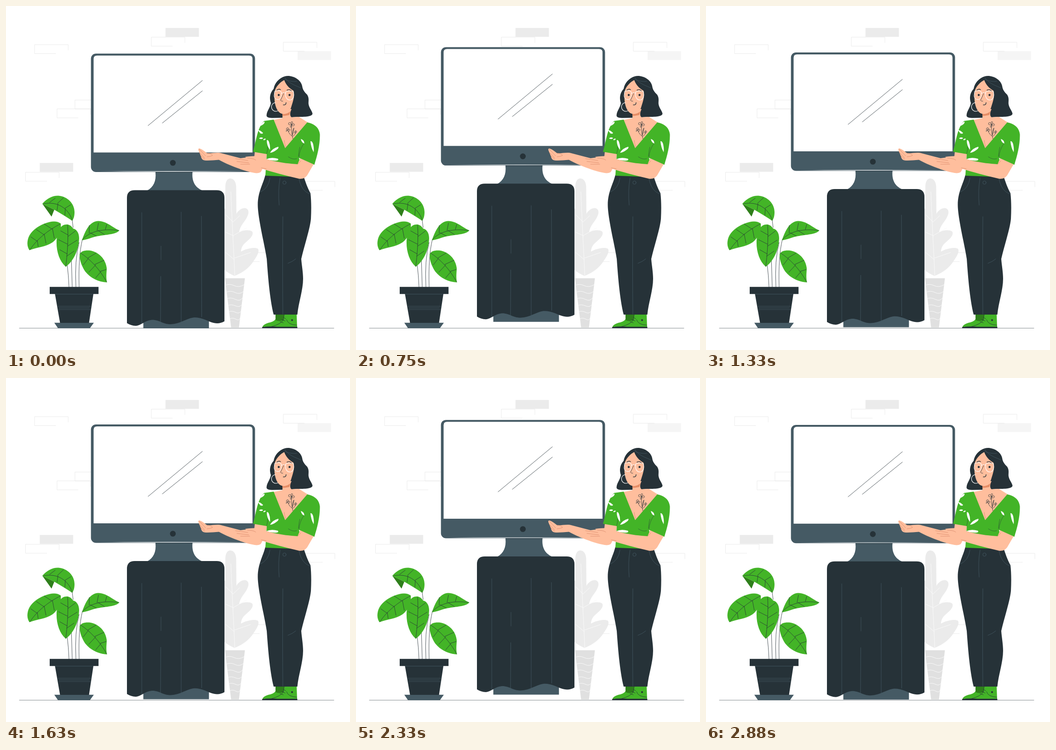
Write an HTML page that moves like this. It is 748x748 px and loops after 2930 ms.

```html
<!DOCTYPE html>
<html lang="en">
<head>
<meta charset="utf-8">
<title>Floating monitor</title>
<style>
html, body { margin: 0; width: 100%; height: 100%; overflow: hidden; background: #fff; }
svg { display: block; width: 100vw; height: 100vh; }
.dark { fill: #263238; }
.slate { fill: #455a64; }
.green { fill: #43b427; }
.deep { fill: #2f7f1b; }
.skin { fill: #ffbe9d; }
.pale { fill: #ebebeb; }
.line { fill: none; stroke: #263238; stroke-width: .8; stroke-linecap: round; stroke-linejoin: round; }
.bold { stroke-width: 1.4; }
.seam { stroke: #455a64; }
.faint { stroke: #e6e6e6; }
.vein { stroke: #fafafa; stroke-width: 1; }
.crease { stroke: #d98a6a; }
.white { stroke: #fff; stroke-width: 1.1; }
</style>
</head>
<body>
<svg viewBox="0 0 748 748">
  <defs>
    <path id="brick" class="line faint" d="M73 12V0H0V19.500H46"/>
    <rect id="block" width="72.700" height="19.200"/>
  </defs>

  <!-- wall -->
  <use href="#block" class="pale" x="346.800" y="47.800"/>
  <use href="#block" class="pale" x="73.400" y="341.300"/>
  <use href="#block" fill="#f5f5f5" x="634" y="98.200"/>
  <use href="#brick" x="316" y="67.800"/>
  <use href="#brick" x="62.200" y="84"/>
  <use href="#brick" x="603" y="78.800"/>
  <use href="#brick" x="150" y="204.400"/>
  <use href="#brick" x="111" y="223.700"/>
  <use href="#brick" x="42.500" y="361.500"/>
  <use href="#brick" x="642" y="381.200"/>
  <use href="#brick" x="505" y="536.300"/>
  <path class="line" stroke-opacity=".7" d="M29 700.500H713"/>

  <!-- grey plant -->
  <path class="pale" d="M488 375C496 375 500.500 384 500.500 394L501 452C505 444 514 438 522 440C529 443 528 451 525 457C521 468 509 476 507 492C515 487 529 486 535 490C539 495 534 502 529 507C521 515 512 519 511 534C521 528 540 523 548 528C552 534 545 545 538 555C528 571 512 581 497 587C488 583 480 579 466 566V446L477 440V394C477 383 480 375 488 375Z"/>
  <path class="line vein" d="M489 404C491 460 495 530 497.500 586M478 454L494 470M494.500 469L508 456M478 492L495.500 500M496 498L523 483M478 536L497 552M497 548L532 536"/>
  <path fill="#e0e0e0" d="M476 592H519.500L506.500 699H489.500Z"/>
  <path class="line vein" d="M478 607Q486 603 496 608T518 606M480 622Q488 618 498 623T516 621M481 636Q489 633 499 638T514 635M483 651Q490 648 499 652T512 650M484 665Q491 662 499 666T511 664M487 680Q493 677 500 681T509 679"/>

  <!-- monitor and stand -->
  <g id="float">
    <path class="slate" d="M298.600 660H441.300V701H298.600Z"/>
    <path class="slate" d="M325 355H405.500V362C404 380 410 394 427.500 401.500H306.500C321 394 327 380 325 362Z"/>
    <path class="dark" d="M280 400.500H458Q475 400.500 475 417V685.500C466 691 456 691 446 687.500C432 682 421 676 407 677.500C391 680 379 691 358 692C340 692 334 682 317 682.500C301 684 295 694.500 282 695.500C275 695.500 269 693 263 689.500V417Q263 400.500 280 400.500Z"/>
    <path class="line seam" d="M295.200 449V690M337 522V552M336.500 588L336 686M380.900 448V688M425 457L425.500 676"/>
    <rect class="slate" x="184.700" y="103.600" width="356.800" height="257.400" rx="11"/>
    <path fill="#fff" d="M190.500 318.500V115Q190.500 107.700 198 107.700H528.500Q536 107.700 536 115V318.500Z"/>
    <circle class="dark" cx="362.800" cy="341" r="6.300"/>
    <path class="line" d="M309 260L427 162M340 254.500L427 184.500"/>
    <path fill="#fff" d="M203 359.600Q360 358.600 516 359.600Q360 360.800 203 359.600Z"/>
    <path class="line" d="M326 361.700H405" stroke-opacity=".7"/>
  </g>

  <!-- potted plant -->
  <path class="line" d="M133 562Q136 585 137 611M142 545L144 611M159 514Q149 552 152 611M166 508Q157 545 159 611M144 466L146 482"/>
  <g class="green">
    <path d="M79 430C89 418 102 412 114 412.500C134 414 149 430 149 448C149 457 147 463 144 467C132 459 119 451 105 443Z"/>
    <path d="M119 473C110 466 97 468 84 473C68 479 54 490 49 503C45 514 46 524 51 531C65 525 87 524 101 514C113 505 121 489 119 473Z"/>
    <path d="M134 475C119 474 112 487 110 510C109 533 116 555 130 567C144 557 158 535 159 505C159 493 153 485 146 484C143 479 139 476 134 475Z"/>
    <path d="M165 509.500C171 494 179 469 200 467.500C218 467 232 482 246.500 488C239 497 218 497 199 500.500C186 503 177 508 165 509.500Z"/>
    <path d="M160 541C162 533 171 531 181 531.500C201 534 217 550 219 570C219 579 217 588 219.500 601C201 600 184 592 172 577C164 565 160 552 160 541Z"/>
  </g>
  <path class="deep" d="M79 430L105 443L99 458Z"/>
  <path class="line" d="M82 430C112 424 136 440 144 466M95 427L107 418M112 429L125 417M113 430L111 444M128 440L141 432M129 441L128 455M118 474C92 487 67 507 52 530M100 485L83 474M101 484L105 505M82 497L66 486M83 496L87 516M67 511L54 502M68 510L70 523M134 477C136 506 133 543 130 566M135 498L119 489M135 501L151 489M134 518L114 508M134 522L155 509M133 539L117 530M132 544L148 533M166 508C184 488 213 484 245 488M181 494L181 477M183 493L196 500M198 488L201 472M200 488L214 497M216 486L219 475M162 537C184 551 204 573 219 600M178 548L196 537M179 549L168 563M193 562L213 553M195 563L180 579M205 577L218 573M206 578L195 591"/>
  <path class="slate" d="M105 688.800H191L182.500 700.500H113Z"/>
  <path class="dark" d="M95 610.800H201.200V626.300H190L180.500 689H117.500L106.500 626.300H95Z"/>
  <path class="line seam" d="M107 626.500H189M113 653H185M115 656.500H181M115 660H184"/>

  <!-- shoes and trousers -->
  <path class="green" d="M586 670H632L633 698H558Q558 693 570 689Q582 687 586 681Z"/>
  <path class="deep" d="M586 670H605L603 683Q594 687 586 683Z"/>
  <path class="line" d="M605 671L603 683Q597 692 578 697M596 686L603 689M600 682L607 685M603 677L608 680M610 682Q613 693 632 694"/>
  <circle class="dark" cx="622" cy="683" r="2"/>
  <path class="dark" d="M557 698Q578 696 590 697.500H633.500V700.500H557Z"/>
  <path class="dark" d="M564 367C559 388 547 405 547.500 434C548 462 563 523 567 550C569 578 573 636 582 671H633.500C636 645 646 618 646 593C646 578 643 564 642 550C648 523 661 485 663 463C664 443 664 424 662 407C655 394 651 382 647 370Z"/>
  <path class="line seam" d="M602 458Q601 570 602 670M613 559.500Q623 556 630 550M596 374Q591 400 594 433M574 374Q571 397 552 405M637 375Q642 403 662 409"/>
  <circle class="line seam" cx="605.500" cy="384" r="3.600"/>

  <!-- far arm -->
  <path class="skin" d="M541 317L567 321C567 336 561 349 554 361Q549 365 538 362.500C512 357 484 346 463 334.500C451 335 440 337 431 335.500Q425 334 424 327L418.500 314Q417 309 421.500 310C427 312 432 316 437 320C447 321 456 318 466 319.500L510 331L540 327Z"/>
  <path class="line crease" d="M420 311L434 326M420 318L432 330M423 325L432 333M437 320Q447 320 449 325Q444 328 437 328"/>

  <!-- head -->
  <path class="dark" d="M606 153C593 157 584 168 582 180C574 189 572 200 576 211C574 222 567 228 566.500 238Q566 243 578 243.500L603 243L635 241C648 241 666 241 666.500 234C665 227 660 223 658 214C657 208 660 201 655 193C649 187 645 182 644 174C641 159 621 149 606 153Z"/>
  <path class="skin" d="M602 226L621 224C617 232 617 239 621 242L637 241L656 253L608 312L580 248L601 244Z"/>
  <path fill="#e58d66" d="M601 234Q612 236 619 228Q617 234 616 237Q608 239 601 239Z"/>
  <path class="skin" d="M605 161C597 165 588 174 585 183C582 199 584 216 590 226Q595 235 605 235Q617 233 621 217C624 207 628 197 625 184C616 179 609 172 605 161Z"/>
  <path class="line seam" d="M606 155C613 168 630 173 641 178M607 160Q620 165 632 164"/>
  <path class="line bold" d="M589 183Q593 179 597 182M611 183Q617 180 621 185M603 215Q609 216 609 210"/>
  <path class="line" d="M604 190L597 205Q599 208 602 207"/>
  <circle class="dark" cx="593" cy="193.500" r="2.200"/>
  <circle class="dark" cx="616.500" cy="193.500" r="2.200"/>
  <path class="line white" d="M584 186Q592 182 598 186Q601 198 594 203Q585 205 583 196ZM608 187Q616 183 625 186Q628 200 620 204Q611 206 608 196ZM599 190Q603 187 608 190M586 210A9.500 9.500 0 1 0 591 228"/>
  <path class="line" d="M624 289Q620 276 621 260M623 283Q617 281 613 271M624 283Q630 280 630 272M623 280Q626 274 626 265Q622 272 623 280"/>
  <path class="line" d="M621 258Q612 260 615 254Q618 252 621 258Q618 250 623 252Q625 254 621 258Q628 254 627 259Q625 263 621 258Q622 266 618 263ZM613 269Q607 270 611 265Q616 264 613 269Q619 266 617 271Q613 275 613 269Q607 276 610 270M628 273Q630 269 632 273Q632 277 628 276Z"/>

  <!-- blouse -->
  <path class="green" d="M582 247L607 309L655 253C670 256 681 264 682.500 279C683 301 677 325 670.500 345L637 330L646 372L564 369L567 322L537 317C544 296 545 267 561 250Z"/>
  <path class="line" d="M614 328Q624 335 632 332M567 321Q569 313 569 306M637 329Q638 312 649 297M636 327Q637 313 639 307" stroke-opacity=".65"/>
  <path class="line crease" d="M605 292Q606 302 609 307"/>
  <path fill="#fff" d="M567 292Q570 290 572 296Q575 304 574 313Q567 304 567 292ZM592 306Q594 309 588 313Q580 319 574 319Q580 309 592 306ZM566 333Q577 328 591 332Q594 335 589 336Q577 337 566 333ZM553 261Q556 254 562 251Q564 256 553 261ZM548 270Q552 269 559 276Q558 279 553 277ZM550 288Q554 284 559 287Q557 291 550 288ZM559 291Q562 287 565 289Q563 293 559 291ZM641 289Q648 291 649 299Q643 298 641 289ZM662 294Q666 293 668 301Q670 310 669 318Q663 307 662 294ZM663 334Q668 335 671 341Q665 340 663 334Z"/>

  <!-- near arm -->
  <path class="skin" d="M669 344L655 368Q649 377 637 375.500C610 369 579 361 555 353.500C541 348 520 350 509 344Q496 335 497.500 331C506 329 517 334 525 331.500L520 328Q543 325 552 327C566 335 599 342 634 344L640 330Z"/>
  <path class="green" d="M637 330L670.500 345L674 328L645 314Z"/>
  <path class="line crease" d="M499 332L526 336M502 338L528 341M510 344L530 344M525 331Q538 331 543 335M555 352Q562 353 566 354M634 344L641 337"/>
</svg>
<script>
const LOOP = 2930, STEP = 1000 / 24, STEPS = 70, PERIOD = 1500, RISE = 14.96;
const group = document.getElementById('float');
const start = performance.now();

// Height of a linear rise and fall
const lift = ms => RISE * (1 - Math.abs(1 - 2 * (ms % PERIOD) / PERIOD));
const rest = lift(STEP / 2);

function draw(now) {
  const t = Math.max(0, now - start) % LOOP;
  const step = Math.min(STEPS - 1, Math.floor((t + 5) / STEP));
  const y = rest - lift((step + .5) * STEP);
  group.setAttribute('transform', `translate(0 ${y.toFixed(2)})`);
  requestAnimationFrame(draw);
}
draw(start);
</script>
</body>
</html>
```
